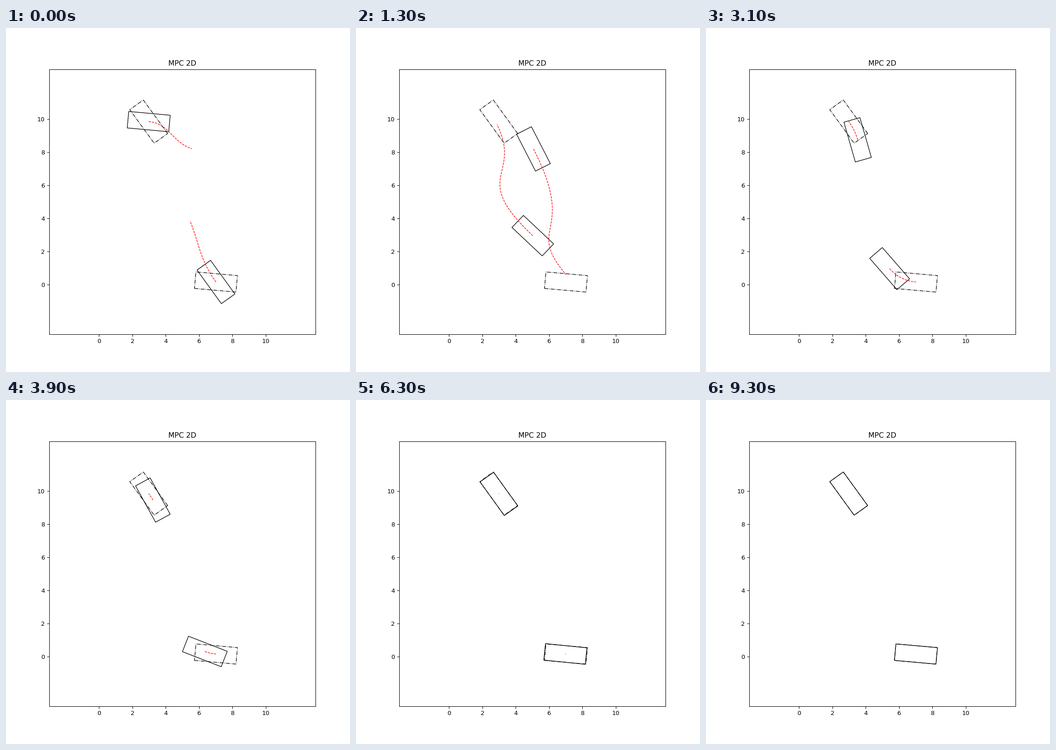
Write a matplotlib script that moves like this. It is 748 by 748 pixels and loops after 10 s.

```python
import numpy as np
import matplotlib.pyplot as plt
from matplotlib.animation import FuncAnimation
from matplotlib.patches import Rectangle

FRAMES, INTERVAL = 100, 100
LENGTH, WIDTH = 2.5, 1.0
MEET, CLEAR, DOCK = 13, 22, 31   # frames at which the cars pass their key poses
SETTLE = 0.122                   # decay rate of the remaining distance
EARLY_REACH, LATE_REACH = np.array([1.2, 1.2]), np.array([2.25, 1.5])


def unit(deg):
    a = np.radians(deg)
    return np.array([np.cos(a), np.sin(a)])


def hermite(p0, p1, m0, m1, t):
    return ((2*t**3 - 3*t**2 + 1) * p0 + (t**3 - 2*t**2 + t) * m0
            + (3*t**2 - 2*t**3) * p1 + (t**3 - t**2) * m1)


def bend(start, end, reach=(1.08, 1.08), samples=200):
    """Curve between two (x, y, heading) poses; reach sets how far each heading holds."""
    start, end = np.asarray(start), np.asarray(end)
    p0, p1 = start[:2], end[:2]
    chord = np.hypot(*(p1 - p0))
    t = np.linspace(0, 1, samples + 1)[:, None]
    return hermite(p0, p1, unit(start[2]) * chord * reach[0],
                   unit(end[2]) * chord * reach[1], t)


class Track:
    """A curve that can be read by distance along it."""

    def __init__(self, points):
        self.points = points
        self.dist = np.r_[0, np.cumsum(np.hypot(*np.diff(points, axis=0).T))]
        self.total = self.dist[-1]
        dx, dy = np.gradient(points, axis=0).T
        self.headings = np.degrees(np.unwrap(np.arctan2(dy, dx)))

    def at(self, s):
        x, y = self.points.T
        return np.stack([np.interp(s, self.dist, x),
                         np.interp(s, self.dist, y)], axis=-1)

    def heading(self, s):
        return np.interp(s, self.dist, self.headings)

    def rest(self, s, count=80):
        return self.at(np.linspace(s, self.total, count))


class Car:
    def __init__(self, poses, first_aim, meet_aim):
        self.start, self.goal = poses[0], poses[-1]
        legs = [bend(a, b) for a, b in zip(poses, poses[1:])]
        self.track = Track(np.vstack([legs[0]] + [leg[1:] for leg in legs[1:]]))
        ends = np.cumsum([len(leg) - 1 for leg in legs])
        self.marks = self.track.dist[ends[:3]]

        # aims are kept relative to the car
        self.first = first_aim - np.array([*poses[0][:2], 0])
        self.meet = meet_aim - np.array([*poses[1][:2], 0])
        self.meet_track = Track(bend(poses[1], meet_aim, LATE_REACH))

    def travel(self, n):
        total = self.track.total
        s1, s2, s3 = self.marks
        left2, left3 = total - s2, total - s3
        rate = np.log(left2 / left3) / (DOCK - CLEAR)
        if n < MEET:
            return s1 * (n / MEET) ** 2.2
        if n < CLEAR:
            span = CLEAR - MEET
            return hermite(s1, s2, 2.2 * s1 / MEET * span,
                           left2 * rate * span, (n - MEET) / span)
        if n < DOCK:
            return total - left2 * np.exp(-rate * (n - CLEAR))
        return total - left3 * np.exp(-SETTLE * (n - DOCK))

    def plan(self, n, s):
        """Predicted path: an early guess that turns into the real remaining route."""
        pos = self.track.at(s)
        if n < MEET:
            w = n / MEET
            aim = np.array([*pos, 0]) + (1 - w) * self.first + w * self.meet
            reach = (1 - w) * EARLY_REACH + w * LATE_REACH
            return bend((*pos, self.track.heading(s)), aim, reach, 80)
        ahead = self.track.rest(s)
        if n < CLEAR:
            w = (n - MEET) / (CLEAR - MEET)
            ahead = w * ahead + (1 - w) * self.meet_track.rest(s - self.marks[0])
            fade = np.linspace(1, 0, len(ahead))[:, None] ** 2
            ahead = ahead + (pos - ahead[0]) * fade
        return ahead


TOP, BOTTOM = (2.985, 9.84), (7.02, 0.15)
DOWN, UP = -5.06, 125.8   # headings of the two cars at both ends

cars = [
    Car([(*TOP, DOWN), (5.07, 8.19, -63), (5.51, 4.11, -113.5),
         (5.44, 0.96, -49), (*BOTTOM, DOWN)],
        first_aim=(5.58, 8.2, -18), meet_aim=(7.02, 0.6, -50)),
    Car([(*BOTTOM, UP), (5.03, 2.95, 136.6), (3.07, 6.28, 66),
         (3.52, 8.74, 106), (*TOP, UP)],
        first_aim=(5.47, 3.84, 111), meet_aim=(2.88, 9.67, 116)),
]

fig, ax = plt.subplots(figsize=(8, 8), dpi=93.5)
ax.set(xlim=(-3, 13), ylim=(-3, 13), title="MPC 2D",
       xticks=range(0, 12, 2), yticks=range(0, 12, 2))


def corner(pos):
    return pos[0] - LENGTH / 2, pos[1] - WIDTH / 2


def add_box(pose, style):
    return ax.add_patch(Rectangle(
        corner(pose), LENGTH, WIDTH, angle=pose[2], rotation_point="center",
        fill=False, edgecolor="black", linewidth=1, linestyle=style))


for car in cars:
    add_box(car.goal, "-.")
boxes = [add_box(car.start, "-") for car in cars]
lines = [ax.plot([], [], "r--", linewidth=1)[0] for _ in cars]


def draw(n):
    for car, box, line in zip(cars, boxes, lines):
        s = car.travel(n)
        box.set_xy(corner(car.track.at(s)))
        box.set_angle(car.track.heading(s))
        line.set_data(*car.plan(n, s).T)
    return boxes + lines


anim = FuncAnimation(fig, draw, frames=FRAMES, interval=INTERVAL, repeat=True)
plt.show()
```
